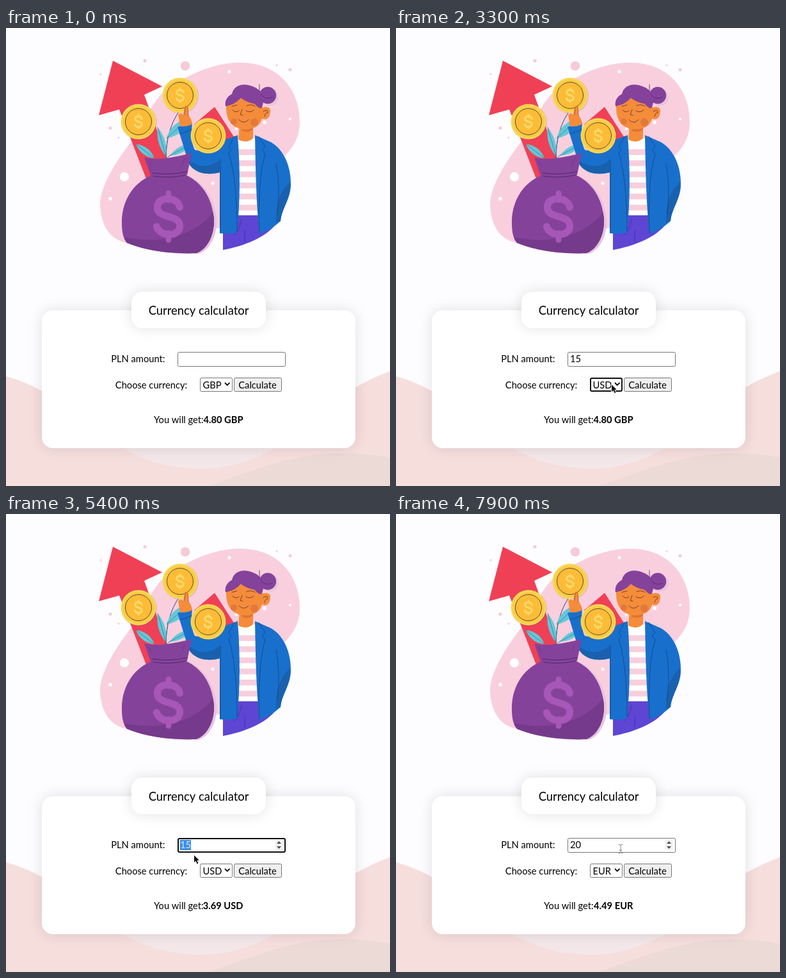
An HTML page with a canvas that plays this animation: 600x714 px, repeating every 8000 ms.

```html
<!DOCTYPE html>
<html lang="en">
<head>
<meta charset="utf-8">
<title>Currency calculator</title>
<style>
html, body { margin: 0; width: 100%; height: 100%; overflow: hidden; background: #fdfcfe; }
canvas { display: block; width: 600px; height: 714px; }
</style>
</head>
<body>
<canvas id="stage" width="600" height="714"></canvas>
<script>
const LOOP = 8000;
const stage = document.getElementById('stage');
const screen = stage.getContext('2d');
const backdrop = document.createElement('canvas');
backdrop.width = 600;
backdrop.height = 714;
let g = backdrop.getContext('2d');

const PURPLE = '#85429b', BLUE = '#1870cc', NAVY = '#17437f', SKIN = '#f48c3a', RED = '#f04056';
const BODY_SIZE = 14.7, TITLE_SIZE = 18.4;

function fill(d, color) {
  g.fillStyle = color;
  g.fill(new Path2D(d));
}
function line(d, color, width = 1) {
  g.strokeStyle = color;
  g.lineWidth = width;
  g.lineCap = g.lineJoin = 'round';
  g.stroke(new Path2D(d));
}
function dot(x, y, r, color) {
  g.fillStyle = color;
  g.beginPath();
  g.arc(x, y, r, 0, 7);
  g.fill();
}
function box(x, y, w, h, r, color, border, width = 1) {
  g.beginPath();
  g.roundRect(x, y, w, h, r);
  g.fillStyle = color;
  g.fill();
  if (border) {
    g.strokeStyle = border;
    g.lineWidth = width;
    g.stroke();
  }
}
// A form control with its border inside the given outer box.
function control(x, y, w, h, color, focused) {
  const b = focused ? 2 : 1;
  box(x + b / 2, y + b / 2, w - b, h - b, 2, color, focused ? '#101010' : '#767676', b);
}
function text(s, x, y, { size = BODY_SIZE, weight = 400, align = 'left', color = '#000' } = {}) {
  g.font = `${weight} ${size}px Lato, sans-serif`;
  g.textAlign = align;
  g.fillStyle = color;
  g.fillText(s, x, y);
  return g.measureText(s).width;
}

function waves() {
  g.fillStyle = '#fdfcfe';
  g.fillRect(0, 0, 600, 714);
  g.fillStyle = '#f4e7ea';
  g.fillRect(100, 600, 400, 114);
  fill('M0 543 Q30 551 60 568 C120 602 180 687 305 687 C425 687 485 595 546 560 Q575 544 600 535 V714 H0Z', '#f6dedd');
  fill('M318 714 C390 688 450 663 530 663 Q570 663 600 670 V714Z', '#ecdad6');
}

function dollar(x, y, s, color) {
  g.save();
  g.translate(x, y);
  g.scale(s, s);
  line('M17 -14 C13 -31 -17 -31 -17 -14 C-17 4 17 -4 17 14 C17 31 -13 31 -18 15', color, 10.5);
  line('M0 -35 V-25 M0 25 V35', color, 8.5);
  g.restore();
}

function coin(x, y) {
  dot(x + 1, y + 1, 28, 'rgba(140,80,110,.18)');
  dot(x, y, 27.5, '#f8d75b');
  dot(x, y, 25, '#f9cd42');
  dot(x, y, 20.5, '#fcbc37');
  g.strokeStyle = '#65483f';
  g.lineWidth = 1;
  g.stroke();
  dollar(x, y, 0.31, '#fad968');
}

function leaf(x, y, tx, ty, bend) {
  const mx = (x + tx) / 2, my = (y + ty) / 2;
  const nx = -(ty - y) * bend, ny = (tx - x) * bend;
  fill(`M${x} ${y} Q${mx + nx} ${my + ny} ${tx} ${ty} Q${mx - nx} ${my - ny} ${x} ${y}`, '#65c7d7');
  line(`M${x} ${y} L${tx} ${ty}`, '#34809b', 0.8);
}

function blobAndArrows() {
  fill('M147 272 C150 240 176 203 195 178 C222 140 232 95 282 77 C310 62 338 54 366 54 C428 54 460 99 459 148 C458 180 441 195 418 216 L400 300 L200 336 C165 336 147 310 147 272Z', '#f9cfde');
  [[185, 232, 7.2], [163, 266, 2.7], [349, 68, 2.6], [323, 242, 2.5], [444, 142, 2], [234, 107, 1.5]]
    .forEach(p => dot(...p, '#fff'));
  [[280, 59, 7.3], [217, 51, 2.6], [444, 65, 2.5], [423, 58, 1.5], [148, 72, 1.5], [163, 156, 2.5], [176, 171, 1.5]]
    .forEach(p => dot(...p, '#f5cbd6'));
  fill('M167 51 L244 91 L216 104 L262 232 L221 240 L177 127 L145 136Z', RED);
  fill('M326 123 L357 171 L330 190 L294 150Z', RED);
}

function plant() {
  line('M250 202 C250 175 257 150 269 132', '#3b4a78', 1);
  leaf(251, 172, 284, 142, 0.32);
  leaf(250, 200, 237, 155, 0.22);
  leaf(232, 203, 203, 181, 0.3);
  leaf(256, 199, 291, 180, 0.24);
  line('M250 202 Q250 186 253 169 M251 203 L257 198', '#34809b', 1);
}

function bag() {
  const body = 'M229 229 C195 242 180 275 181 305 C181 320 184 329 189 335 C220 348 260 352 297 351 C313 346 326 325 325 298 C322 264 306 241 281 229Z';
  g.save();
  g.translate(4, 1);
  fill(body, '#e6c3e0');
  g.restore();
  fill(body, PURPLE);
  g.save();
  g.clip(new Path2D(body));
  fill('M185 326 C250 340 302 318 326 284 V355 H185Z', '#753a8b');
  g.restore();
  fill('M216 202 C240 207 265 201 290 195 L283 229 Q255 235 226 230Z', PURPLE);
  line('M229 226 Q256 230 283 224 M230 231 Q258 235 281 229', '#4e296c', 1);
  line('M223 208 L228 217 M279 204 L275 214', '#713587', 1);
  dollar(254, 294, 1.04, '#a657b8');
}

function jacket() {
  const sleeve = 'M268 154 Q280 153 291 148 Q288 178 295 190 C310 195 326 182 340 170 V223 C310 234 286 222 283 203Z';
  fill(sleeve, BLUE);
  g.save();
  g.clip(new Path2D(sleeve));
  fill('M283 203 C302 222 325 217 340 199 V235 H285Z', '#1961ae');
  g.restore();
  line('M271 165 Q281 163 290 158', NAVY, 0.8);

  fill('M339 316 V346 C371 340 407 327 424 303 L396 285 H362Z', '#5e45d3');
  line('M368 298 Q365 316 356 323 M373 316 V333', '#3d319f', 0.8);
  g.fillStyle = '#fff';
  g.fillRect(360, 172, 36, 120);
  g.fillStyle = '#f7cfdc';
  for (let y = 189; y < 284; y += 17.3) g.fillRect(360, y, 36, 9);

  fill('M362 167 L343 174 Q334 180 334 200 V320 Q348 322 361 319 C366 270 366 220 362 167Z', BLUE);
  fill('M389 167 L414 178 C435 190 446 218 445 246 C444 268 431 280 429 301 Q415 314 396 321 C391 277 390 222 389 167Z', BLUE);
  fill('M444 240 C445 269 431 280 429 301 L422 304 C422 280 424 258 444 240Z', '#1961ae');
  line('M357 169 L348 185 L352 190 L348 195 Q361 235 361 317 M395 169 L405 185 L400 190 L405 196 Q393 235 396 319 M422 211 Q429 245 424 291 M335 205 V318', NAVY, 0.8);
}

function head() {
  fill('M365 150 H386 V172 Q376 181 363 174Z', SKIN);
  fill('M368 157 Q378 160 386 154 V158 Q378 165 368 160Z', '#e0742f');
  dot(413, 108, 13, '#e9c5dc');
  dot(409, 105, 13.2, PURPLE);
  fill('M344 121 C343 146 356 158 374 158 C390 158 398 150 400 141 Q411 146 413 131 Q414 121 401 124 L395 106 L352 103Z', SKIN);
  fill('M343 122 C341 112 347 106 353 103 C355 91 367 86 379 89 C391 92 398 97 401 106 Q404 116 399 125 C393 125 391 120 388 118 Q376 116 367 109 Q357 120 343 122Z', PURPLE);
  line('M396 88 V99 M398 103 Q404 113 416 108', '#4e296c', 0.8);
  dot(356, 146, 5, '#e3783a');
  dot(388, 147, 6, '#e3783a');
  line('M354 128 Q359 133 364 129 M375 129 Q381 133 387 128 M353 122 L361 120 M376 121 Q383 118 389 122 M369 127 L366 135 L370 136 M364 143 Q371 151 379 143 M402 130 Q409 126 409 132 Q405 132 404 138', '#7c3d32', 1);
  dot(404, 147, 2.8, '#fff');
  dot(360, 157, 2.3, '#fff');
}

function hand() {
  fill('M269 135 Q273 132 277 135 L279 124 Q281 119 284 123 L285 136 Q290 141 291 150 Q280 155 272 153Z', SKIN);
  line('M279 135 L280 124 Q282 120 284 124 L285 137', '#a84f2e', 0.8);
}

function card(x, y, w, h, r) {
  g.save();
  g.shadowColor = 'rgba(0,0,0,.12)';
  g.shadowBlur = 22;
  box(x, y, w, h, r, '#fff');
  g.restore();
}

function paintBackdrop() {
  waves();
  blobAndArrows();
  plant();
  jacket();
  bag();
  head();
  coin(272, 105);
  coin(207, 146);
  coin(316, 168);
  hand();
  card(56, 440, 490, 215, 17);
  card(196, 411, 210, 57, 17);
  text('Currency calculator', 301, 446.5, { size: TITLE_SIZE, align: 'center' });
  text('PLN amount:', 206.3, 521, { align: 'center' });
  text('Choose currency:', 227, 561.5, { align: 'center' });
}

// Each track is a list of [time, value] pairs; the latest one holds.
const amount = [[0, ''], [1800, '1'], [2000, '15'], [5700, '2'], [5900, '20']];
const currency = [[0, 'GBP'], [3200, 'USD'], [6750, 'EUR']];
const result = [[0, '4.80 GBP'], [3900, '3.69 USD'], [7400, '4.49 EUR']];
const focus = [[0, ''], [1500, 'input'], [2500, 'select'], [3850, ''], [4800, 'input'], [6400, 'select'], [7250, '']];
const pointer = [
  [2100, 352, 519], [2300, 333, 550], [2600, 332, 555], [3200, 332, 555], [3750, 377, 554],
  [4050, 377, 554], [4600, 292, 518], [4950, 292, 518], [5200, 293, 531], [5950, 293, 531],
  [6350, 335, 555], [6700, 335, 555], [6900, 380, 571], [7150, 382, 559], [7500, 382, 559],
  [7800, 351, 522], [8000, 351, 522]
];

const at = (track, t) => track.filter(k => k[0] <= t).pop()[1];
const during = (t, from, to) => t >= from && t < to;
const inside = (p, x, y, w, h) => p && p.x >= x && p.x < x + w && p.y >= y && p.y < y + h;

function pointerAt(t) {
  if (t < 2100 || during(t, 5700, 5950)) return null;
  const i = Math.max(1, pointer.findIndex(k => k[0] > t));
  const [t0, x0, y0] = pointer[i - 1], [t1, x1, y1] = pointer[i];
  const u = (t - t0) / (t1 - t0), e = u * u * (3 - 2 * u);
  return { x: x0 + (x1 - x0) * e, y: y0 + (y1 - y0) * e };
}

function drawPointer(p, beam) {
  g.save();
  g.translate(p.x, p.y);
  if (beam) {
    line('M-3 -7 Q0 -7 0 -5 Q0 -7 3 -7 M0 -5 V5 M-3 7 Q0 7 0 5 Q0 7 3 7 M-2 2 H2', '#858585', 1);
  } else {
    const arrow = 'M1 1 V12 L3.5 9.8 L5.6 14.4 L7.4 13.6 L5.4 9.1 L8.7 8.8Z';
    line(arrow, '#fff', 1.8);
    fill(arrow, '#111');
  }
  g.restore();
}

function drawInput(t, focused, hover) {
  control(268, 505, 169, 23, '#fff', focused);
  const value = at(amount, t);
  const selected = during(t, 4950, 5700);
  if (selected) {
    g.font = `400 ${BODY_SIZE}px Lato, sans-serif`;
    box(272, 508, g.measureText(value).width, 16, 0, '#3c8fe2');
  }
  const w = text(value, 272, 521, { color: selected ? '#d8ebff' : '#000' });
  if (focused && !selected && t % 1000 < 500) {
    g.fillStyle = '#000';
    g.fillRect(Math.round(272 + w), 508, 1, 16);
  }
  if (focused || hover) {
    box(420.5, 508.5, 12, 15, 0, '#f1f1f1');
    fill('M423 514 L426.5 510 L430 514Z M423 518 L426.5 522 L430 518Z', '#505050');
  }
}

function draw(t) {
  const p = pointerAt(t);
  const active = at(focus, t);
  const beam = inside(p, 268, 505, 169, 22);
  g.drawImage(backdrop, 0, 0);

  drawInput(t, active === 'input', beam || during(t, 1000, 2100));

  control(303, 545, 51, 22, '#fff', active === 'select');
  text(at(currency, t), 307.5, 561.5);
  line('M342.5 553.5 L345.7 556.8 L349 553.5', '#111', 1.8);

  const over = inside(p, 356, 546, 75, 21);
  control(356, 545, 75, 22, over ? '#e3e3e3' : '#efefef');
  text('Calculate', 393, 561.5, { align: 'center' });

  text('You will get:', 231, 616);
  text(at(result, t), 370.5, 616, { weight: 700, align: 'right' });
  if (p) drawPointer(p, beam);
}

paintBackdrop();
g = screen;
const start = performance.now();
function tick() {
  draw((performance.now() - start) % LOOP);
  requestAnimationFrame(tick);
}
tick();
</script>
</body>
</html>
```
